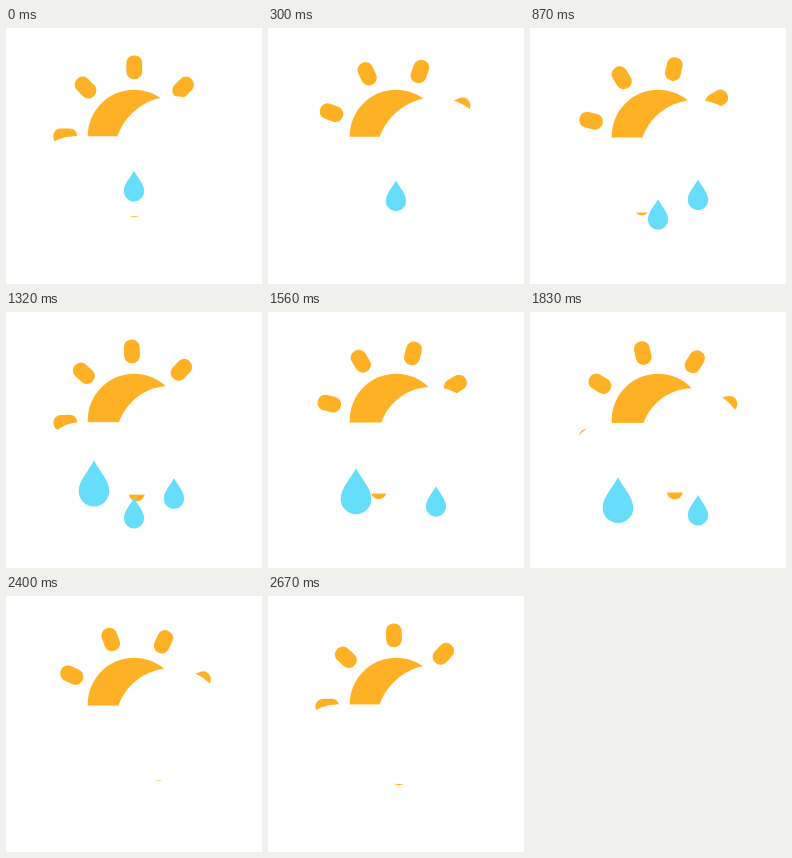
An HTML page for the animation above (2.7 s loop, 256x256 px).

```html
<!DOCTYPE html>
<html lang="en">
<head>
<meta charset="utf-8">
<title>Sun and showers</title>
<style>
html, body { margin: 0; width: 100%; height: 100%; overflow: hidden; background: #fff; }
svg { display: block; width: 100vw; height: 100vh; }
</style>
</head>
<body>
<svg viewBox="0 0 256 256">
  <g fill="#ffb125">
    <circle cx="128.1" cy="108.2" r="46.4"/>
    <g id="rays"></g>
  </g>
  <g id="cloud" fill="#fff">
    <circle cx="-60" cy="20" r="40"/>
    <circle cx="40" r="60"/>
    <rect x="-60" y="-20" width="100" height="80"/>
  </g>
  <g id="drops" fill="#66ddfa"></g>
</svg>
<script>
const LOOP = 2700, STEP = 30;
const FALL = 1380, SPEED = 0.98 / STEP;
const LOW = 2025, SHRINK = 0.145;

const rays = document.getElementById('rays');
const cloud = document.getElementById('cloud');
const dropLayer = document.getElementById('drops');

function add(parent, tag, attrs) {
  const el = document.createElementNS('http://www.w3.org/2000/svg', tag);
  for (const key in attrs) el.setAttribute(key, attrs[key]);
  return parent.appendChild(el);
}

for (let i = 0; i < 8; i++) {
  add(rays, 'rect', {
    x: -7.9, y: -80.9, width: 15.8, height: 23.8, rx: 7.5,
    transform: `rotate(${i * 45})`
  });
}

const drops = [
  { x: 128, y: 142.8, start: 0, size: 1.02 },
  { x: 168, y: 142.8, start: 600, size: 1.02 },
  { x: 88, y: 134.8, start: 900, size: 1.53 }
];
for (const d of drops) {
  d.el = add(dropLayer, 'path', {
    d: 'M0 0C-3 6 -10 13 -10 20A10 10 0 0 0 10 20C10 13 3 6 0 0Z'
  });
}

function draw(t) {
  rays.setAttribute('transform', `translate(128.3 108.3) rotate(${180 * t / LOOP})`);

  // the cloud shrinks slowly, then swells back faster
  const k = t < LOW ? t / LOW : (LOOP - t) / (LOOP - LOW);
  cloud.setAttribute('transform', `translate(128 128.3) scale(${1 - SHRINK * k})`);

  for (const d of drops) {
    const age = t - d.start;
    const on = age >= 0 && age < FALL;
    d.el.setAttribute('visibility', on ? 'visible' : 'hidden');
    d.el.setAttribute('transform', `translate(${d.x} ${d.y + age * SPEED}) scale(${d.size})`);
  }
}

const begin = performance.now();
function tick() {
  const t = (performance.now() - begin) % LOOP;
  draw(Math.floor(t / STEP) * STEP);
  requestAnimationFrame(tick);
}
draw(0);
requestAnimationFrame(tick);
</script>
</body>
</html>
```
